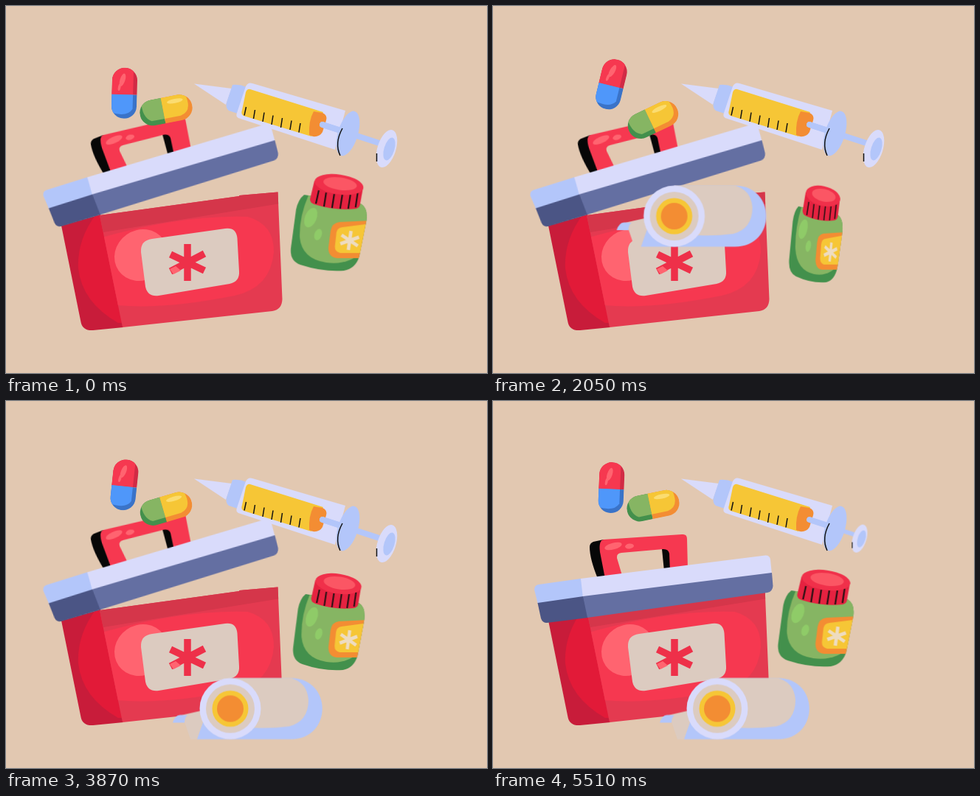
An HTML page for the animation above (5560 ms loop, 652 by 498 pixels).

```html
<!DOCTYPE html>
<html lang="en">
<head>
<meta charset="utf-8">
<title>First aid kit</title>
<style>
@property --p { syntax: '<number>'; inherits: true; initial-value: 0; }
html, body { margin: 0; width: 100%; height: 100%; overflow: hidden; background: #e2c8b1; }
svg {
  --ice: #b3c6fa; --pale: #d9dbfb; --cream: #dccbc0; --yellow: #f6c636; --orange: #f38d33;
  --red: #f63850; --deep: #e43a50; --glow: #ff6470; --leaf: #86b563; --moss: #43904c;
  display: block; width: 652px; height: 498px; animation: drift 5560ms linear infinite;
}
.ice { fill: var(--ice); } .pale { fill: var(--pale); } .cream { fill: var(--cream); }
.yellow { fill: var(--yellow); } .orange { fill: var(--orange); } .red { fill: var(--red); }
.deep { fill: var(--deep); } .glow { fill: var(--glow); } .leaf { fill: var(--leaf); } .moss { fill: var(--moss); }
.ink { fill: none; stroke: #111; stroke-width: 1.5; }

/* --p drives everything that floats: 0 at rest, 1 fully swung */
@keyframes drift {
  0% { --p: .11; } 20.5% { --p: .51; } 36.87% { --p: .91; } 42.27% { --p: 1; }
  55.94% { --p: .76; } 69.6% { --p: .41; } 88.13% { --p: 0; } 99.1% { --p: .16; } 100% { --p: .17; }
}
.red-pill { transform: translate(160.5px, calc(120px - 15px * var(--p))) rotate(calc(15deg * var(--p))); }
.green-pill { transform: translate(217px, calc(139.5px + 16.5px * var(--p))) rotate(calc(-9deg - 18deg * var(--p))); }
.bottle { transform: translate(437.5px, calc(292px + 19.5px * var(--p))) scaleX(cos(calc(50deg * var(--p)))) translate(-437.5px, -292px); }

.lid { transform-origin: 62px 290px; animation: shut 5560ms linear infinite; }
@keyframes shut { 0%, 84.35% { transform: rotate(-9.4deg); } 88.49%, 100% { transform: none; } }

.plunger { transform-origin: 442px 167px; animation: press 5560ms linear infinite; }
@keyframes press { 0%, 88.67% { transform: none; } 100% { transform: scale(.72); } }

.roll { animation: leave 5560ms linear infinite, inside 5560ms step-end infinite; }
.roll.front { animation-name: leave, outside; }
@keyframes leave {
  0% { transform: translate(236px, 312px); }
  20.5% { transform: translate(220.5px, 243px); }
  25.54% { transform: translate(216px, 222px); }
  36.87% { transform: translate(245.5px, 285px); }
  51.26%, 100% { transform: translate(304px, 417.5px); }
}
@keyframes inside { 0% { opacity: 1; } 25.54%, 100% { opacity: 0; } }
@keyframes outside { 0% { opacity: 0; } 25.54%, 100% { opacity: 1; } }
</style>
</head>
<body>
<svg viewBox="0 0 652 498" xmlns="http://www.w3.org/2000/svg">
  <defs>
    <clipPath id="capsule"><rect x="-36" y="-17.5" width="72" height="35" rx="17.5"/></clipPath>
    <clipPath id="front"><path d="M127 284L316 258V257L368.500 252.500L374.500 398Q374 412 361 414L158 436Z"/></clipPath>
    <clipPath id="side"><path d="M75 298L128 283L159 436L118 440Q104 441 101.500 429Z"/></clipPath>
    <clipPath id="jar"><path d="M404 254Q396 260 393 274L386 326Q384 344 399 349Q430 359 458 357Q474 354 479 338L489 288Q491 272 481 266Z"/></clipPath>
    <path id="star" d="M0 -25V25M-23 -11L23 11M23 -12L-23 12"/>
    <g id="bandage">
      <path class="cream" d="M-67 9L-36 2L-34 41.500H-54L-62 18Z"/>
      <path class="ice" d="M-78 19Q-75 9 -68 8.500L-58 9Q-62 12 -62 19Z"/>
      <path class="ice" d="M0 -41.500H82C139 -41.500 139 41.500 82 41.500H-45L-34 10Z"/>
      <path class="cream" d="M0 -41.500H82Q104 -36 106 -12Q106 17 80 24Q56 27 34 26L0 30Z"/>
      <circle r="41.500" class="pale"/>
      <circle r="33" class="cream"/>
      <circle r="24.500" class="yellow"/>
      <circle r="18" class="orange"/>
    </g>
  </defs>

  <rect width="652" height="498" fill="#e2c8b1"/>

  <!-- syringe -->
  <path class="pale" d="M255 105.500L306 112L298 134Z"/>
  <path class="ice" d="M307 107Q317 106 326 110L314 146L302 142Q297 138 299 131Z"/>
  <path class="pale" d="M334 105L460 142L446 195L315 152Q311 150 313 145L325 109Q328 103 334 105Z"/>
  <path class="yellow" d="M331 113L430 144L414 177L322 149Q318 147 320 141L325 117Q327 112 331 113Z"/>
  <path class="orange" d="M417 143L429 145Q436 148 434 155L429 171Q425 178 416 177L411 175Q410 156 417 143Z"/>
  <path class="ink" d="M325.500 137L323 148.500M337.500 141L335.500 153M350 144.500L348 157M362 148.500L360 161M374.500 152L372.500 165M387 155.500L385 168M399 159L397 171.500"/>
  <g class="plunger">
    <path d="M429 161L512 188" stroke="var(--ice)" stroke-width="8" stroke-linecap="round"/>
    <ellipse class="pale" cx="516" cy="193.500" rx="12.500" ry="26.500" transform="rotate(17 516 193.500)"/>
    <ellipse class="ice" cx="519.500" cy="194" rx="7" ry="16" transform="rotate(17 519.500 194)"/>
    <path class="ink" d="M502.500 200V211"/>
  </g>
  <path d="M429 161L460 171" stroke="var(--ice)" stroke-width="8" stroke-linecap="round"/>
  <ellipse class="ice" cx="463.500" cy="173" rx="13.500" ry="31.500" transform="rotate(17 463.500 173)"/>
  <path class="ink" d="M456 166Q445 186 453 203"/>

  <use href="#bandage" class="roll"/>

  <!-- box -->
  <g clip-path="url(#side)">
    <path d="M70 280H160V442H70Z" fill="#c81c3a"/>
    <path d="M124 280Q96 316 98 356Q103 402 152 430H162V280Z" fill="#e21a38"/>
  </g>
  <g clip-path="url(#front)">
    <path class="deep" d="M120 250H380V440H120Z"/>
    <path class="red" d="M130 314Q240 283 328 286Q364 297 363 334Q359 382 310 393Q215 412 150 406Z"/>
    <path d="M120 280L372 250V268L132 307Z" fill="#d5364a"/>
    <ellipse class="glow" cx="183" cy="338" rx="37" ry="34" transform="rotate(-35 183 338)"/>
  </g>
  <path class="cream" d="M198 316L297 302Q312 300 313.500 315L316 360Q317 374 303 377L207 393Q192 395 189 381L183 334Q182 318 198 316Z"/>
  <use href="#star" transform="translate(246 348)" fill="none" stroke="#ee3049" stroke-width="9.500"/>
  <path class="glow" d="M222 357L230 353L237 359L227 364Z"/>

  <!-- lid with handle, drawn closed -->
  <g class="lid">
    <path d="M131 198Q131 193 136 191L150 188L156 239L142 241Q131 214 131 198ZM229 201H240V230L232 231Z" fill="#070707"/>
    <path class="red" d="M150 188L256 181Q263 180 263 187L264 228L240 231L239 207Q238 201 231 201L174 206Q167 207 168 213L176 240L152 241L145 205Q143 189 150 188Z"/>
    <ellipse class="glow" cx="163" cy="197" rx="12" ry="4.500" transform="rotate(-14 163 197)"/>
    <ellipse class="glow" cx="185" cy="197" rx="6" ry="3.500" transform="rotate(-8 185 197)"/>
    <path class="ice" d="M62 249L119 241L125 267L61 276L56 256Q56 250 62 249Z"/>
    <path class="pale" d="M119 241L369 209.500Q375 209 376 215L378 235.500L122 268Z"/>
    <path d="M60.500 274L122.500 265L129 294L73 301Q67 301 65 295Z" fill="#4b5585"/>
    <path d="M122 265L378 233L379.500 251Q379 258.500 372 260L128 294Z" fill="#646fa2"/>
  </g>

  <use href="#bandage" class="roll front"/>

  <!-- pills -->
  <g class="red-pill">
    <g transform="rotate(90) scale(.958 .972)" clip-path="url(#capsule)">
      <path d="M-36 -18H2V18H-36Z" fill="#d12b45"/>
      <path d="M2 -18H36V18H2Z" fill="#3a73c8"/>
      <path class="red" d="M-36 -12H2V18H-36Z"/>
      <path d="M2 -12H22Q34 -5 28 18H2Z" fill="#4f97fa"/>
    </g>
    <ellipse class="glow" cx="-3" cy="-18" rx="3.500" ry="9" transform="rotate(16 -3 -18)"/>
    <ellipse class="glow" cx="-7" cy="-8" rx="1.800" ry="5" transform="rotate(10 -7 -8)"/>
  </g>
  <g class="green-pill">
    <g clip-path="url(#capsule)">
      <path class="moss" d="M-36 -18H-4V18H-36Z"/>
      <path class="orange" d="M-4 -18H36V18H-4Z"/>
      <path class="leaf" d="M-31 -18H-4V11H-22Q-34 4 -31 -18Z"/>
      <path class="yellow" d="M-4 -18H29Q36 8 18 11H-4Z"/>
    </g>
    <ellipse cx="14" cy="-10" rx="11" ry="3" fill="#fbdc70"/>
  </g>

  <!-- bottle -->
  <g class="bottle">
    <g clip-path="url(#jar)">
      <path class="moss" d="M380 240H495V362H380Z"/>
      <path class="leaf" d="M412 250Q397 282 398 312Q401 341 434 346Q466 350 484 330L495 250Z"/>
      <ellipse cx="413" cy="285" rx="8" ry="14" transform="rotate(22 413 285)" fill="#8fcb68"/>
      <ellipse cx="423" cy="308" rx="5" ry="8" transform="rotate(20 423 308)" fill="#8fcb68"/>
      <path class="orange" d="M452 291L495 289V340H449Q437 339 437 326L440 303Q442 292 452 291Z"/>
      <path class="yellow" d="M456 298L495 293V333H453Q445 331 446 323L448 305Q449 299 456 298Z"/>
      <use href="#star" transform="translate(466 316) rotate(8) scale(.52)" stroke="#eedcc0" stroke-width="9"/>
    </g>
    <path d="M418 235L412 260Q412 265 418 267Q447 276 474 273Q479 272 480 268L484.500 243Z" fill="#e52240"/>
    <path d="M424 248L420 266M434 251L431 270M445 253L442 272M456 254L453 273M467 254L464 273M477 251L474 271" stroke="#15100f" stroke-width="2"/>
    <ellipse cx="451.500" cy="240" rx="33.500" ry="13.500" transform="rotate(8 451.500 240)" fill="#f0304a"/>
    <ellipse cx="453" cy="239" rx="23" ry="8.500" transform="rotate(8 453 239)" fill="#fb5664"/>
  </g>
</svg>
</body>
</html>
```
